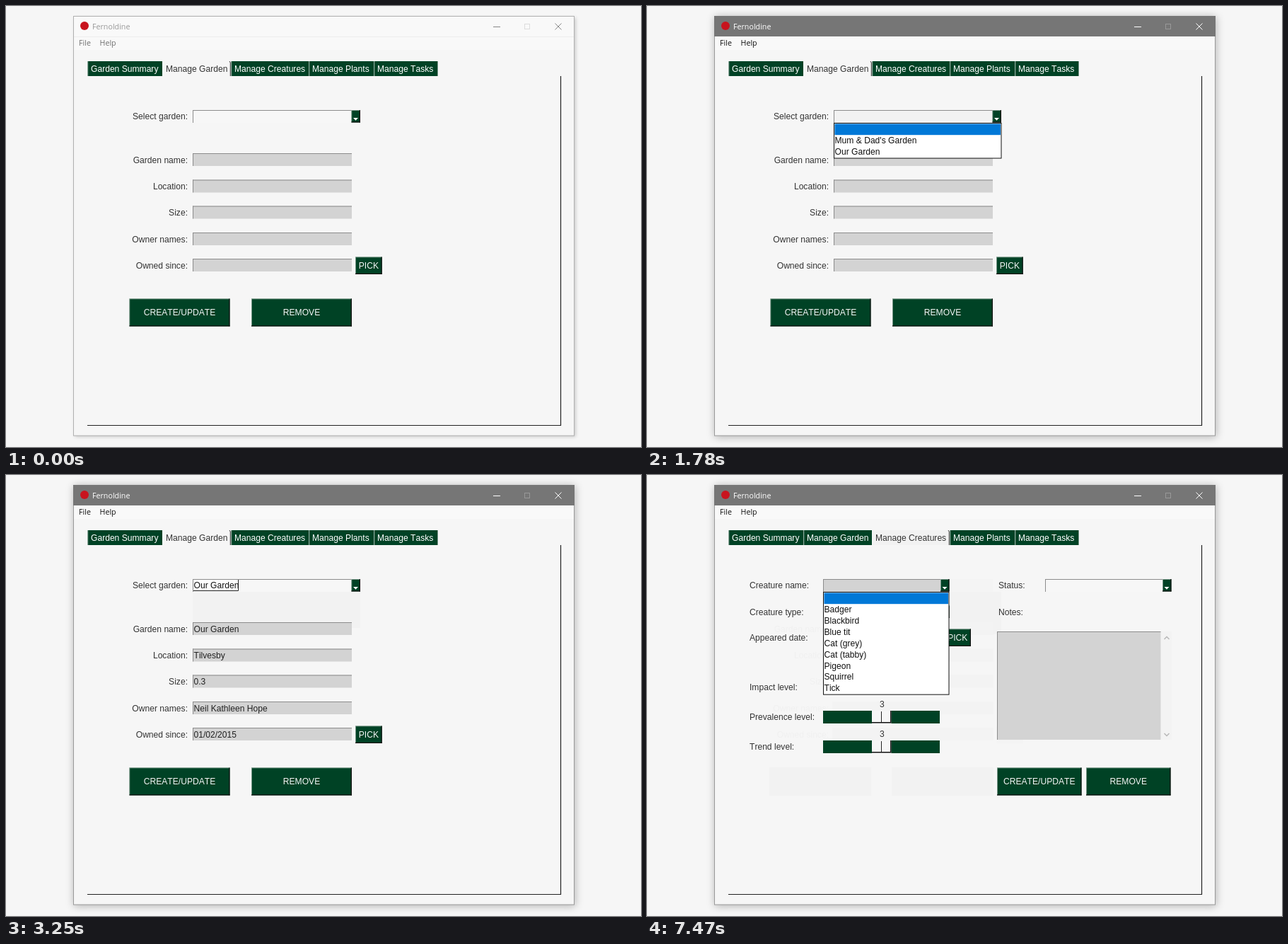
These frames come from a looping animation (898 by 623 pixels, 8 s). An HTML page with a canvas:

```html
<!DOCTYPE html>
<html lang="en">
<head>
<meta charset="utf-8">
<title>Garden manager</title>
<style>
html, body { margin: 0; width: 100%; height: 100%; overflow: hidden; background: #f6f6f6; }
canvas { display: block; }
</style>
</head>
<body>
<canvas id="stage" width="898" height="623"></canvas>
<script>
const ctx = document.getElementById('stage').getContext('2d');
const LOOP = 8000;
const GREEN = '#004225', BLUE = '#0078d7', PANEL = '#f6f6f6', FIELD = '#d3d3d3', GHOST = '#f2f2f2', INK = '#333';
const SANS = '12.1px "Liberation Sans", Arial, sans-serif';
const UI = '10.7px "Open Sans", "Noto Sans", sans-serif';
const TABS = [
  ['Garden Summary', 115, 221], ['Manage Garden', 221, 318], ['Manage Creatures', 318, 428],
  ['Manage Plants', 428, 520], ['Manage Tasks', 520, 610.5]
];
const GARDENS = ['', "Mum & Dad's Garden", 'Our Garden'];
const CREATURES = ['', 'Badger', 'Blackbird', 'Blue tit', 'Cat (grey)', 'Cat (tabby)', 'Pigeon', 'Squirrel', 'Tick'];
const DETAILS = [
  ['Garden name:', 208, 'Our Garden'], ['Location:', 245.5, 'Tilvesby'], ['Size:', 282.5, '0.3'],
  ['Owner names:', 320, 'Neil Kathleen Hope'], ['Owned since:', 357, '01/02/2015']
];

function rect(x, y, w, h, color) {
  ctx.fillStyle = color;
  ctx.fillRect(x, y, w, h);
}

function text(str, x, y, color = INK, align = 'left', font = SANS) {
  ctx.font = font;
  ctx.fontKerning = 'none';
  ctx.textAlign = align;
  ctx.fillStyle = color;
  ctx.fillText(str, x, y);
}

function path(points, color, width = 1) {
  ctx.beginPath();
  points.forEach(([x, y]) => ctx.lineTo(x, y));
  ctx.strokeStyle = color;
  ctx.lineWidth = width;
  ctx.stroke();
}

function field(x, y, w, h = 18, fill = FIELD) {
  rect(x, y, w, h, fill);
  rect(x, y, w, 1, '#8c8c8c');
  rect(x, y, 1, h, '#8c8c8c');
}

function raised(x, y, w, h, fill = GREEN) {
  rect(x, y, w, h, fill);
  rect(x, y, w, 0.7, '#a9b9b0');
  rect(x, y, 0.7, h, '#a9b9b0');
  rect(x, y + h - 1.2, w, 1.2, '#111');
  rect(x + w - 1.2, y, 1.2, h, '#111');
}

function button(label, x, y, w, h) {
  raised(x, y, w, h);
  text(label, x + w / 2, Math.round(y + h / 2 + 4), '#f4f4f4', 'center');
}

function combo(x, y, w, fill, hover) {
  field(x, y, w, 18, fill);
  const bx = x + w;
  raised(bx, y, 12.5, 17.5, hover ? '#eee' : GREEN);
  ctx.beginPath();
  ctx.moveTo(bx + 2.5, y + 11);
  ctx.lineTo(bx + 9.5, y + 11);
  ctx.lineTo(bx + 6, y + 14.7);
  ctx.fillStyle = hover ? '#f6f6f6' : '#fff';
  ctx.fill();
}

function dropdown(items, x, w, selected) {
  const pitch = 15.85, h = items.length * pitch + 3;
  rect(x, 165, w, h, '#111');
  rect(x + 1, 166, w - 2, h - 2, '#fff');
  rect(x + 1.5, 166.5 + selected * pitch, w - 3, 15.7, BLUE);
  items.forEach((item, i) => text(item, x + 1.5, Math.round(178.4 + i * pitch), i === selected ? '#fff' : '#111'));
}

function windowFrame(active, menuDark) {
  rect(0, 0, 898, 623, PANEL);
  ctx.save();
  ctx.shadowColor = active ? 'rgba(0,0,0,.28)' : 'rgba(0,0,0,.2)';
  ctx.shadowBlur = active ? 11 : 5;
  ctx.shadowOffsetX = ctx.shadowOffsetY = active ? 1 : 1.5;
  rect(95, 14, 709, 593.5, active ? '#999' : '#b0b0b0');
  ctx.restore();
  rect(96, 15, 707, 591.5, PANEL);
  rect(96, 43, 707, 19, '#f9f9f9');
  if (active) rect(95, 14, 709, 29, '#767676');
  else {
    rect(96, 15, 707, 28, '#f9f9f9');
    rect(96, 43, 707, 1, '#eee');
  }

  ctx.beginPath();
  ctx.arc(111, 28, 6, 0, Math.PI * 2);
  ctx.fillStyle = '#c8141e';
  ctx.fill();
  text('Fernoldine', 122, 33, active ? '#fff' : '#999', 'left', UI);
  const icon = active ? '#fff' : '#888';
  path([[689, 29.5], [699, 29.5]], icon);
  ctx.strokeStyle = active ? '#999' : '#ddd';
  ctx.strokeRect(733.5, 25.5, 7, 7);
  path([[776.5, 24.5], [785.5, 33.5]], icon);
  path([[785.5, 24.5], [776.5, 33.5]], icon);

  const menu = menuDark ? '#111' : '#707070';
  text('File', 103, 56, menu, 'left', UI);
  text('Help', 132.5, 56, menu, 'left', UI);
  path([[784.5, 99], [784.5, 592.5], [115, 592.5]], '#222', 1.2);
}

function tabs(selected) {
  TABS.forEach(([label, x, end], i) => {
    const open = i === selected;
    if (!open) {
      rect(x + 0.5, 78, end - x - 0.5, 21, GREEN);
      rect(x + 0.5, 78, 0.7, 21, '#a9b9b0');
    } else {
      if (i === 2) rect(x + 1, 78, end - x - 2, 21, GHOST);
      path([[end - 2, 78], [end - 0.7, 80], [end - 0.7, 99]], '#333');
    }
    text(label, x + 5, 93, open ? INK : '#fff');
  });
}

function gardenPage(t) {
  const chosen = t >= 3250, listed = t >= 1780 && !chosen;
  text('Select garden:', 257, 160, INK, 'right');
  combo(264, 147, 224.5, listed ? '#f2f2f2' : '#f7f7f7', t >= 1290 && t < 1780);
  if (chosen) {
    rect(264, 165, 237, 51, GHOST);
    rect(265, 148, 64, 16, '#fff');
    path([[265, 163.5], [328.5, 163.5], [328.5, 148]], '#222');
    text('Our Garden', 265.5, 160, '#111');
  }
  DETAILS.forEach(([label, y, value]) => {
    const base = Math.round(y + 13.6);
    text(label, 257, base, INK, 'right');
    field(264, y, 225);
    if (chosen) text(value, 265.5, base, '#222');
  });
  button('PICK', 494, 354.5, 37.7, 24.5);
  button('CREATE/UPDATE', 174.5, 413.5, 142, 39);
  button('REMOVE', 347, 413.5, 142, 39);
  if (listed) dropdown(GARDENS, 264, 237.5, t < 2620 ? 0 : t < 2850 ? 1 : 2);
}

// Faint remains of the page that was open before
function gardenGhost() {
  rect(264, 147, 225, 18, '#f4f4f4');
  rect(264, 165, 237, 60, GHOST);
  DETAILS.forEach(([label, y]) => {
    rect(262, y, 228, 18, '#f3f3f3');
    text(label, 257, Math.round(y + 13.6), '#f0f0f0', 'right');
  });
  rect(494, 355, 38, 24, '#f4f4f4');
  rect(173, 413, 144, 40, GHOST);
  rect(346, 413, 144, 40, GHOST);
}

function slider(label, y) {
  text(label, 145, y + 13);
  text('3', 332.3, y - 5, INK, 'center');
  rect(249, y, 165, 18, GREEN);
  rect(318, y, 27.5, 18, PANEL);
  path([[318, y + 16.7], [344.8, y + 16.7], [344.8, y]], '#111', 1.5);
  path([[331.5, y + 1], [331.5, y + 16]], '#222');
}

function creaturePage(t) {
  const listed = t >= 7470;
  gardenGhost();
  text('Creature name:', 145, 160);
  text('Creature type:', 145, 198);
  text('Appeared date:', 145, 234);
  combo(249, 147, 166, FIELD, t >= 7150 && !listed);
  combo(249, 184.5, 166, FIELD);
  field(249, 220, 166);
  button('PICK', 420.5, 217.5, 37.5, 24.5);
  slider('Impact level:', 291);
  slider('Prevalence level:', 333);
  slider('Trend level:', 375);

  text('Status:', 497, 160);
  combo(563, 147, 166, '#f7f7f7');
  text('Notes:', 497, 198);
  field(495, 221, 231.5, 153);
  rect(727, 221, 15, 153, '#f3f3f3');
  path([[731.5, 232], [735, 228.5], [738.5, 232]], '#b8b8b8', 1.5);
  path([[731.5, 365], [735, 368.5], [738.5, 365]], '#b8b8b8', 1.5);
  button('CREATE/UPDATE', 495, 413.5, 119.5, 39);
  button('REMOVE', 621, 413.5, 119.5, 39);

  const caret = t < 6520 || (t >= 6840 && t < 7380);
  if (caret) rect(250.5, 149, 1, 15, '#111');
  if (listed) dropdown(CREATURES, 249, 178.5, 0);
}

function draw(now) {
  const t = now % LOOP, creatures = t >= 5880;
  windowFrame(t >= 1780, t >= 1690);
  tabs(creatures ? 2 : 1);
  (creatures ? creaturePage : gardenPage)(t);
}

const start = performance.now();
function tick() {
  draw(performance.now() - start);
  requestAnimationFrame(tick);
}
tick();
</script>
</body>
</html>
```
